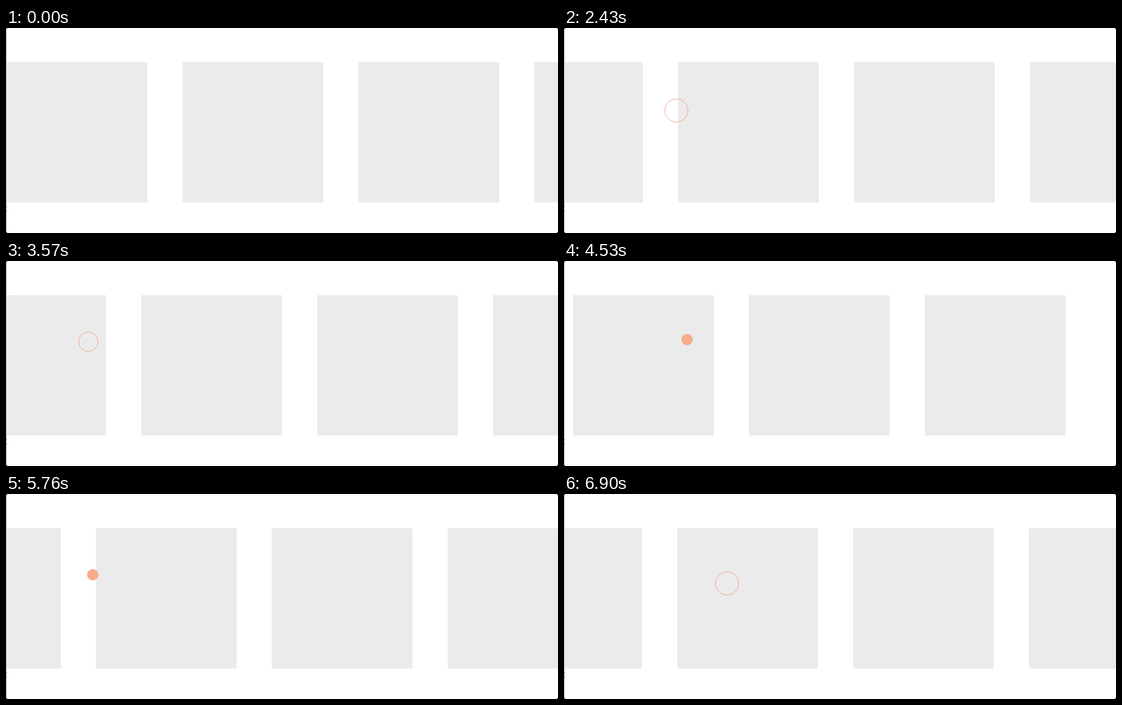
An HTML page that plays this animation: 888x330 px, repeating every 6930 ms.

```html
<!DOCTYPE html>
<html lang="en">
<head>
<meta charset="utf-8">
<title>Carousel flick</title>
<style>
  html, body { margin: 0; width: 100%; height: 100%; overflow: hidden; background: #fff; }
  svg { display: block; width: 888px; height: 330px; }
</style>
</head>
<body>
<svg viewBox="0 0 888 330">
  <rect width="888" height="330" fill="#fff"/>
  <svg x="1" width="887" height="330" viewBox="1 0 887 330">
    <g id="track" fill="#ebebeb"></g>
  </svg>
  <rect width="1" height="330" fill="#b8b8b8"/>
  <path d="M0 0h2L0 2zM888 0h-2l2 2zM0 330h2l-2-2zM888 330h-2l2-2z" fill="#000"/>
  <path d="M0 287h1v1h-1zM0 294h1v1h-1z" fill="#000"/>
  <circle id="cursor" stroke="#f0a58a"/>
</svg>
<script>
const LOOP = 6930, STEP = 30;
const PITCH = 283, SIZE = PITCH * 0.8;
const IDLE_R = 18.6, PRESSED_R = 8.6, SHRINK = 120, GROW = 210;
const DECAY = 214;

const stop = (t, x, y) => ({ t, x, y });

// The pointer drags the track from one stop to the other, then the track glides on
const flicks = [
  { from: stop(1270, 256.5, 143), to: stop(1690, 71, 118.7), glide: 204.3 },
  { from: stop(2860, 220, 137.8), to: stop(3424, 128.5, 130.1), glide: 307.5 },
  { from: stop(4330, 250, 129), to: stop(4720, 148.6, 124.1), glide: 301.6 },
  { from: stop(5510, 232, 138), to: stop(5850, 106.2, 127.1), glide: 213.8 }
];
const entry = stop(270, 60, -16), approach = stop(960, 152, 122), exit = stop(6650, 262.3, 144);
const stops = [entry, approach, ...flicks.flatMap(f => [f.from, f.to]), exit];

const track = document.getElementById('track');
const cursor = document.getElementById('cursor');
const set = (el, attrs) => { for (const k in attrs) el.setAttribute(k, attrs[k]); };
const clamp = v => Math.max(0, Math.min(1, v));
const mix = (a, b, u) => a + (b - a) * u;
const smooth = u => u * u * u * (10 + u * (6 * u - 15));

const tiles = Array.from({ length: 5 }, () => {
  const tile = document.createElementNS('http://www.w3.org/2000/svg', 'rect');
  set(tile, { y: 55, width: SIZE, height: 226 });
  return track.appendChild(tile);
});

const isPressed = t => flicks.some(f => t >= f.from.t && t < f.to.t);

// Drags are steady, free moves ease in and out
function pointerAt(t) {
  const next = stops.findIndex(s => s.t > t);
  if (next < 0) return exit;
  const a = stops[Math.max(0, next - 1)], b = stops[next];
  const u = clamp((t - a.t) / (b.t - a.t));
  const k = isPressed(t) ? u : smooth(u);
  return { x: mix(a.x, b.x, k), y: mix(a.y, b.y, k) };
}

function offsetAt(t) {
  let x = 1;
  flicks.forEach(({ from, to, glide }, i) => {
    x += (to.x - from.x) * clamp((t - from.t) / (to.t - from.t));
    const end = i + 1 < flicks.length ? flicks[i + 1].from.t : LOOP;
    const free = Math.min(t, end) - to.t;
    if (free > 0) x -= glide * (1 - Math.exp(-free / DECAY));
  });
  return x;
}

function radiusAt(t) {
  let r = IDLE_R;
  for (const { from, to } of flicks) {
    if (t >= from.t) r = mix(IDLE_R, PRESSED_R, clamp((t - from.t) / SHRINK));
    if (t >= to.t) r = mix(PRESSED_R, IDLE_R, clamp((t - to.t) / GROW));
  }
  return r;
}

function draw(t) {
  const first = offsetAt(t) % PITCH - PITCH;
  tiles.forEach((tile, i) => set(tile, { x: (first + i * PITCH).toFixed(2) }));
  const { x, y } = pointerAt(t);
  set(cursor, {
    cx: x, cy: y, r: radiusAt(t),
    fill: isPressed(t) ? '#f8ad89' : 'none',
    visibility: t < entry.t ? 'hidden' : 'visible'
  });
}

const start = performance.now();
function tick() {
  const t = (performance.now() - start) % LOOP;
  draw(Math.floor(t / STEP) * STEP);
  requestAnimationFrame(tick);
}
tick();
</script>
</body>
</html>
```
